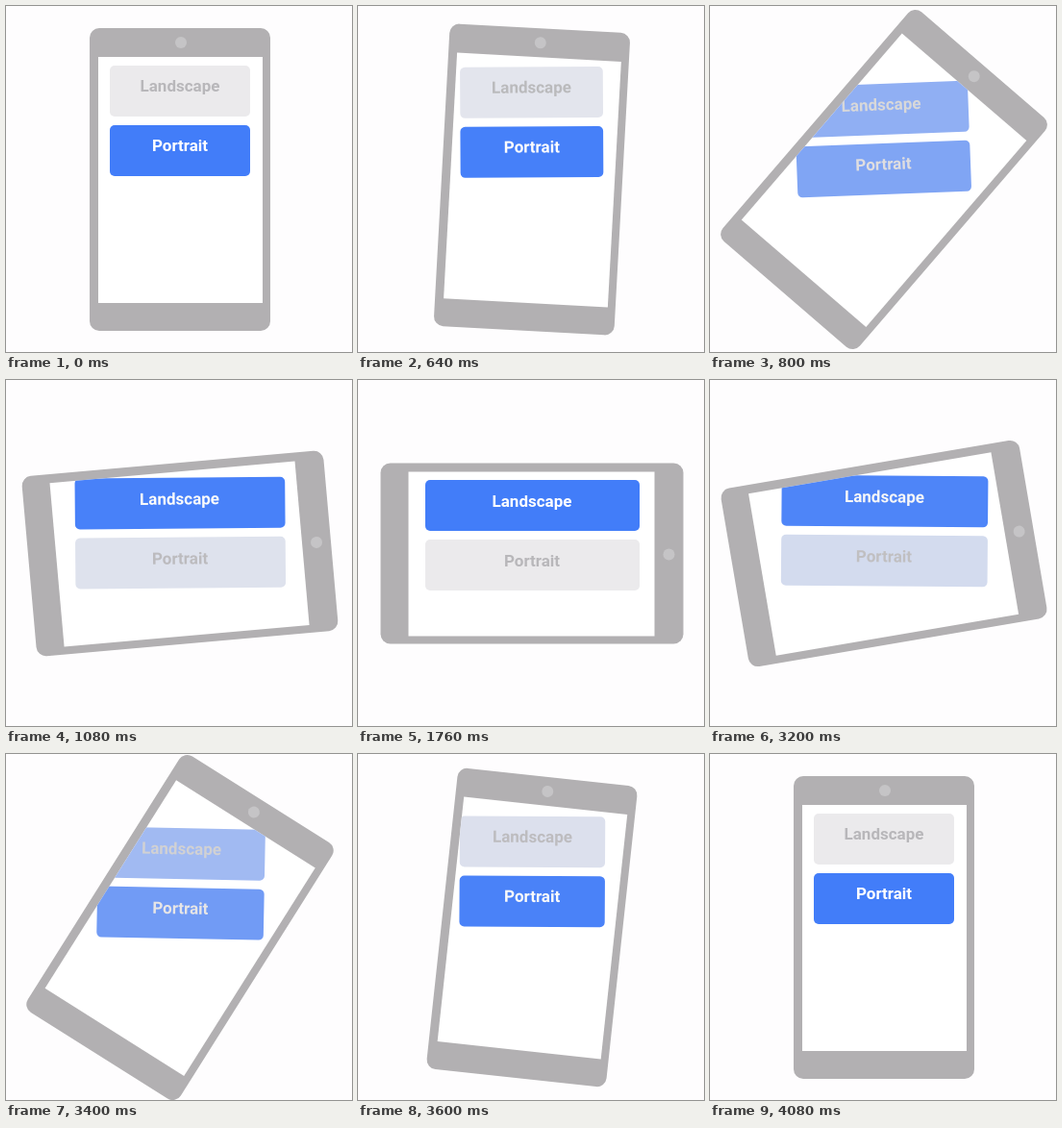
Recreate the animation shown at these times as an HTML page with a canvas. Size 360 by 360 pixels, loop 4120 ms.

```html
<!DOCTYPE html>
<html lang="en">
<head>
<meta charset="utf-8">
<title>Device rotation</title>
<style>
  html, body { margin: 0; overflow: hidden; background: #fefdfe; }
  canvas { display: block; width: 360px; height: 360px; }
</style>
</head>
<body>
<canvas id="stage"></canvas>
<script>
const LOOP = 4120;
const CENTER = [181, 180.5];
const GREY = [235, 234, 236], BLUE = [66, 125, 249];
const TEXT_OFF = [184, 183, 186], TEXT_ON = [255, 255, 255];

// [ms, easing phase]: 0 is the resting pose, 1 is the finished turn
const TURN = [[557, 0], [1293, 1]];
const TURN_BACK = [[3199, 0], [3200, .182], [3400, .413], [3720, .848], [3832, 1]];

const canvas = document.getElementById('stage');
const ctx = canvas.getContext('2d');
const scale = window.devicePixelRatio || 1;
canvas.width = canvas.height = 360 * scale;

const mix = (a, b, k) => a + (b - a) * k;
const mixColor = (a, b, k) => `rgb(${a.map((v, i) => Math.round(mix(v, b[i], k)))})`;

function phaseAt(keys, t) {
  if (t <= keys[0][0]) return 0;
  const i = keys.findIndex(key => t < key[0]);
  if (i < 0) return 1;
  const [t0, a] = keys[i - 1], [t1, b] = keys[i];
  return mix(a, b, (t - t0) / (t1 - t0));
}

// cubic-bezier(.4, 0, .2, 1)
function ease(x) {
  let low = 0, high = 1;
  for (let i = 0; i < 24; i++) {
    const s = (low + high) / 2, r = 1 - s;
    if (1.2 * s * r * r + .6 * s * s * r + s * s * s < x) low = s; else high = s;
  }
  return low * low * (3 - 2 * low);
}

function box(x, y, w, h, radius, color) {
  ctx.beginPath();
  ctx.roundRect(x, y, w, h, radius);
  ctx.fillStyle = color;
  ctx.fill();
}

function button(label, top, turn, active) {
  const width = mix(146, 223, turn);
  const glow = active * (1.35 - .35 * active);
  box(-width / 2 + turn * .5, top, width, 53, 5, mixColor(GREY, BLUE, glow));
  ctx.fillStyle = mixColor(TEXT_OFF, TEXT_ON, active);
  ctx.fillText(label, 0, top + mix(27, 28, turn));
}

function draw(t) {
  const back = t >= 2000;
  const progress = ease(phaseAt(back ? TURN_BACK : TURN, t));
  const turn = back ? 1 - progress : progress;
  const angle = turn * Math.PI / 2;
  const tilt = (back ? 1.2 : -2.2) * 4 * turn * (1 - turn) * Math.PI / 180;

  ctx.setTransform(scale, 0, 0, scale, 0, 0);
  ctx.fillStyle = '#fefdfe';
  ctx.fillRect(0, 0, 360, 360);
  ctx.save();
  ctx.translate(...CENTER);

  ctx.rotate(angle);
  box(-94, -157.5, 188, 315, 10, '#b2b0b2');
  box(-5, -148.5, 12, 12, 6, '#c5c4c6');
  box(-85, -127.5, 171, 256, 0, '#fff');
  ctx.clip();

  // The page counter-rotates almost in step with the device
  ctx.rotate(tilt - angle);
  ctx.font = 'bold 17px Roboto, sans-serif';
  ctx.textAlign = 'center';
  const top = mix(-118.5, -76.5, turn);
  button('Landscape', top, turn, turn);
  button('Portrait', top + 62, turn, 1 - turn);
  ctx.restore();
}

const start = performance.now();
function tick() {
  draw((performance.now() - start) % LOOP);
  requestAnimationFrame(tick);
}
tick();
</script>
</body>
</html>
```
